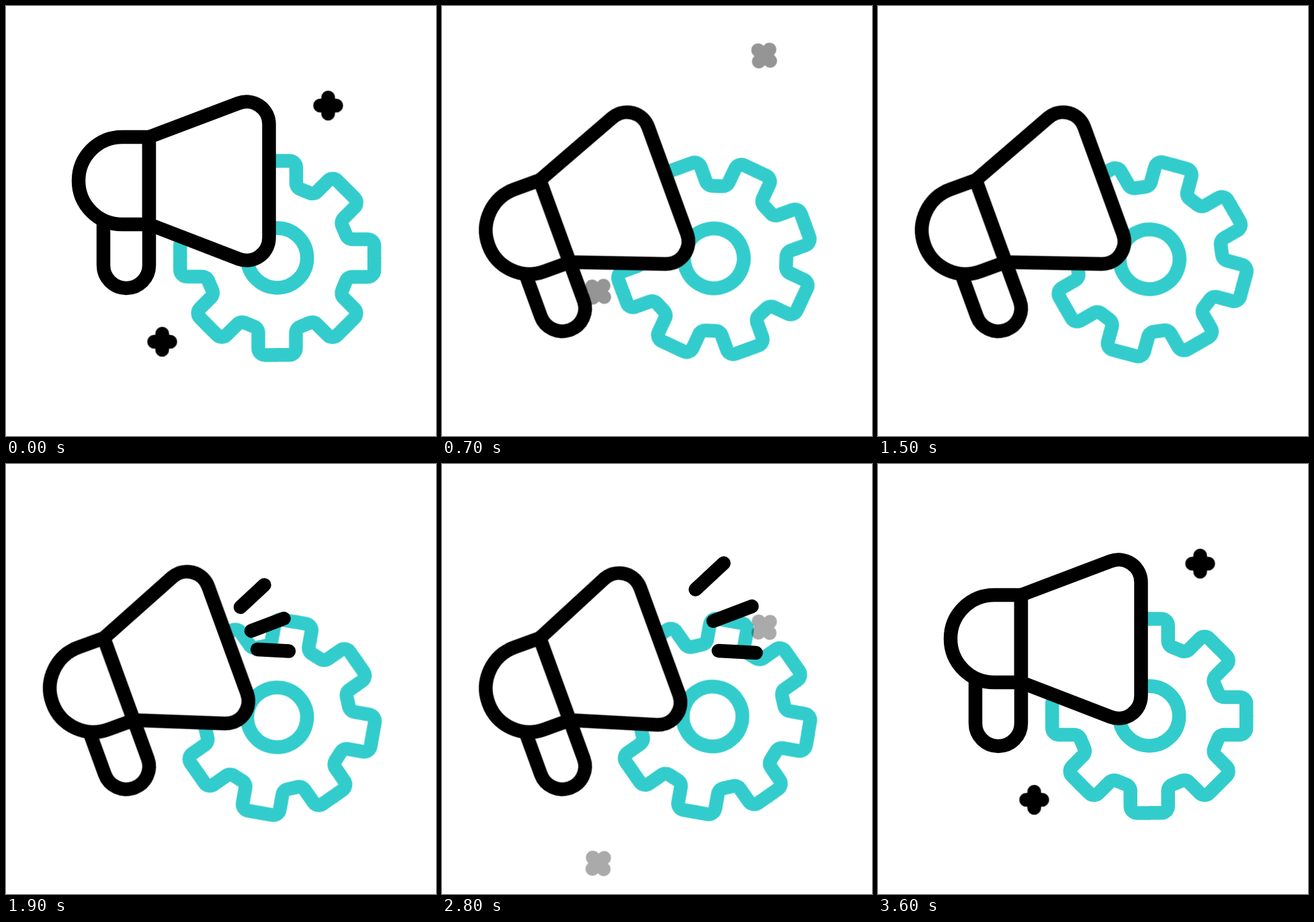
These frames come from a looping animation (640x640 px, 3.62 s). An HTML page:

```html
<!DOCTYPE html>
<html lang="en">
<head>
<meta charset="utf-8">
<title>Megaphone and gear</title>
<style>
  html, body { margin: 0; width: 100%; height: 100%; overflow: hidden; background: #fff; }
  svg { display: block; width: 640px; height: 640px; }

  .ink { fill: none; stroke: #000; stroke-width: 20.5; stroke-linecap: round; stroke-linejoin: round; }
  .solid { fill: #fff; }
  .teal { fill: none; stroke: #3cc; stroke-width: 20.5; }

  .gear, .mega, .horn, .star, .rays path { animation: 3.62s linear infinite; }

  .gear { transform-origin: 403.7px 376px; animation-name: spin; }
  @keyframes spin {
    0% { transform: rotate(0deg); }
    99.448%, 100% { transform: rotate(360deg); }
  }

  /* The megaphone tilts up, fires, then drops back. */
  .mega { transform-origin: 528px 451px; animation-name: tilt; }
  @keyframes tilt {
    0% { transform: translate(0, 0) rotate(0deg); animation-timing-function: cubic-bezier(.45, 0, .55, 1); }
    16.575% { transform: translate(1.2px, -59.1px) rotate(-20deg); }
    81.768% { transform: translate(1.2px, -59.1px) rotate(-20deg); animation-timing-function: cubic-bezier(.45, 0, .55, 1); }
    99.448%, 100% { transform: translate(0, 0) rotate(0deg); }
  }

  .horn { animation-name: squeeze; animation-timing-function: ease-in-out; }
  @keyframes squeeze {
    0%, 27.624%, 38.674%, 49.724%, 60.773%, 71.823%, 82.873%, 100% {
      d: path("M213 195L346.2 144.6A33.5 33.5 0 0 1 391.5 176V345A33.5 33.5 0 0 1 346.2 376.4L213 325Z");
    }
    33.149%, 55.249%, 77.348% {
      d: path("M213 195L333.7 144.6A33.5 33.5 0 0 1 379 176V345A33.5 33.5 0 0 1 333.7 376.4L213 325Z");
    }
  }

  .rays path { stroke-dasharray: 0 300; animation-name: shoot, blink; }
  @keyframes shoot {
    0%, 27.624%, 49.724%, 71.823% { stroke-dasharray: 0 300; stroke-dashoffset: 0; }
    30.939%, 53.039%, 75.138% { stroke-dasharray: 43 300; stroke-dashoffset: 0; }
    35.359%, 57.459%, 79.558% { stroke-dasharray: 43 300; stroke-dashoffset: -57; }
    38.674%, 60.773%, 82.873%, 100% { stroke-dasharray: 0 300; stroke-dashoffset: -100; }
  }
  @keyframes blink {
    0%, 38.674%, 60.773%, 82.873%, 100% { opacity: 0; animation-timing-function: step-end; }
    27.624%, 49.724%, 71.823% { opacity: 1; animation-timing-function: step-end; }
  }

  .star { animation-name: rise, fade; }
  @keyframes rise {
    0% { transform: translateY(0) rotate(0deg); animation-timing-function: cubic-bezier(.167, .167, .667, 1); }
    33.149% { transform: translateY(-102px) rotate(180deg); animation-timing-function: step-end; }
    66.298% { transform: translateY(128px) rotate(-180deg); animation-timing-function: cubic-bezier(.167, 0, .833, .833); }
    99.448%, 100% { transform: translateY(0) rotate(0deg); }
  }
  @keyframes fade {
    0%, 99.448%, 100% { opacity: 1; }
    33.149%, 66.298% { opacity: 0; }
  }
</style>
</head>
<body>
<svg viewBox="0 0 640 640">
  <defs>
    <path id="tooth" d="M144.5 -1V18A10 10 0 0 1 134.5 28H111.7A10 10 0 0 0 102.4 34.2L96.7 48.3A10 10 0 0 0 98.8 59.2L114.9 75.3A10 10 0 0 1 114.9 89.4L101.5 102.8"/>
    <path id="plus" d="M-12 0H12M0 -12V12"/>
  </defs>

  <g class="gear">
    <g class="teal" transform="translate(403.7 374.9)">
      <circle r="44.5"/>
      <use href="#tooth"/>
      <use href="#tooth" transform="rotate(45)"/>
      <use href="#tooth" transform="rotate(90)"/>
      <use href="#tooth" transform="rotate(135)"/>
      <use href="#tooth" transform="rotate(180)"/>
      <use href="#tooth" transform="rotate(225)"/>
      <use href="#tooth" transform="rotate(270)"/>
      <use href="#tooth" transform="rotate(315)"/>
    </g>
  </g>

  <g class="ink">
    <g transform="translate(479.5 148.3)"><use class="star" href="#plus"/></g>
    <g transform="translate(232.5 499.8)"><use class="star" href="#plus"/></g>
  </g>

  <g class="ink rays">
    <path pathLength="100" d="M349 213L447 122"/>
    <path pathLength="100" d="M365 248.4L499 197.6"/>
    <path pathLength="100" d="M374 276L504 283"/>
  </g>

  <g class="mega ink">
    <path class="solid" d="M145 318V386A34 34 0 0 0 213 386V325"/>
    <path class="solid" d="M213 195H173A65 65 0 0 0 173 325H213Z"/>
    <path class="solid horn" d="M213 195L346.2 144.6A33.5 33.5 0 0 1 391.5 176V345A33.5 33.5 0 0 1 346.2 376.4L213 325Z"/>
  </g>
</svg>
</body>
</html>
```
